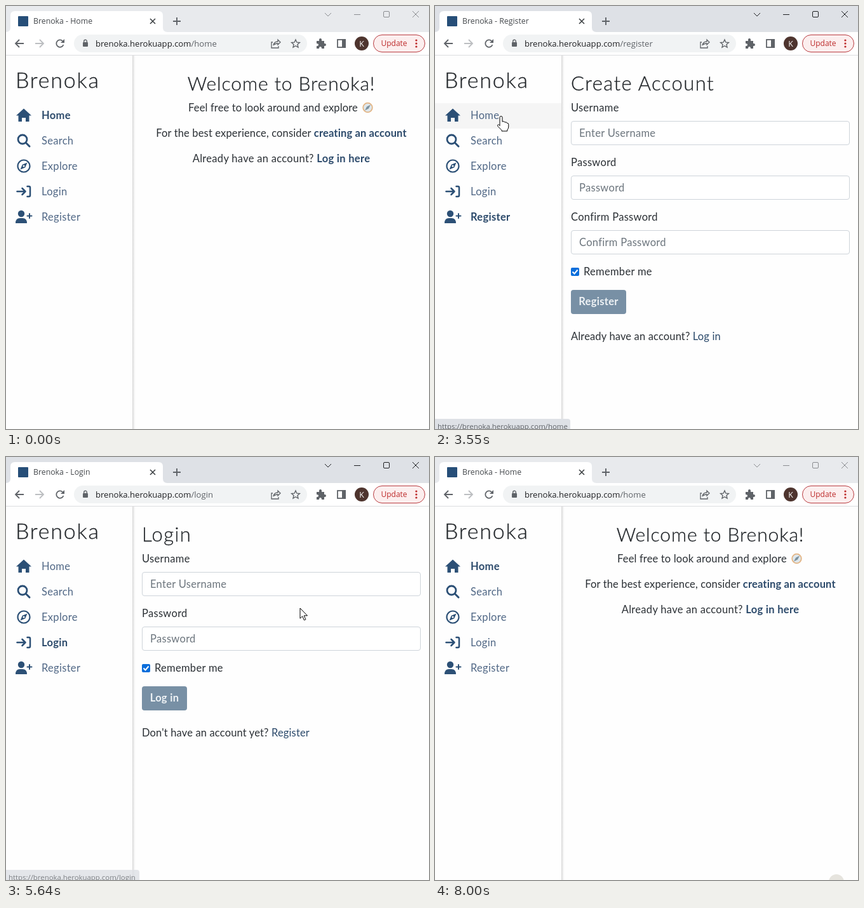
Animation of 666 by 666 pixels, one loop 8.13 s. Source, as an HTML page:

```html
<!DOCTYPE html>
<html lang="en">
<head>
<meta charset="utf-8">
<title>Brenoka</title>
<style>
html, body { margin: 0; width: 100%; height: 100%; overflow: hidden; background: #fff; }
svg { display: block; width: 666px; height: 666px; }
text { font: 16.5px Lato, sans-serif; letter-spacing: .3px; fill: #2b3035; white-space: pre; }
.ui { font: 12.3px "Open Sans", sans-serif; letter-spacing: 0; fill: #45494d; }
.url { font-size: 13.1px; fill: #202124; }
.status { font-size: 11.4px; fill: #5f6368; }
.logo, .head { font-weight: 300; font-size: 34px; letter-spacing: 1.8px; fill: #212529; stroke: #212529; stroke-width: .3px; }
.head { font-size: 31px; letter-spacing: 1.4px; }
.welcome { font-size: 30px; letter-spacing: .9px; }
.tight { letter-spacing: .15px; }
.mid { text-anchor: middle; }
.b { font-weight: 700; fill: #2c4a6b; }
.nav text { fill: #516886; }
.nav .on text { font-weight: 700; fill: #2c4a6b; }
.nav rect { fill: none; }
.nav .over rect { fill: #f5f5f5; }
.link { fill: #2c4a6b; }
.link.over { fill: #182639; text-decoration: underline; }
.hint { fill: #6c757d; }
.btn { font-weight: 700; fill: #eef2f5; }
.line { fill: none; stroke: #5f6368; stroke-width: 1.8; }
.thin { fill: none; stroke: #1f2023; stroke-width: 1; }
.ink { fill: #2c5076; }
.pen { fill: none; stroke: #2c5076; stroke-width: 2.5; stroke-linecap: round; stroke-linejoin: round; }
.idle .thin { stroke: #8b8d91; }
.idle .strip { fill: #e8eaed; }
.idle .plus { stroke: #5f6368; }
.cursor path { fill: #fff; stroke: #000; stroke-width: 1; stroke-linejoin: round; }
</style>
</head>
<body>
<svg viewBox="0 0 666 666">
  <defs>
    <linearGradient id="shade">
      <stop offset="0" stop-color="#d4d4d4"/>
      <stop offset="1" stop-color="#fff" stop-opacity="0"/>
    </linearGradient>
  </defs>
  <rect width="666" height="666" fill="#fefefe"/>

  <g id="view"></g>

  <rect x="199" y="78" width="6" height="588" fill="url(#shade)"/>
  <rect y="78" width="199" height="588" fill="#fefefe"/>
  <text class="logo" x="15" y="129">Brenoka</text>
  <g class="nav" id="nav"></g>

  <g id="chrome">
    <rect class="strip" width="666" height="42" fill="#dee1e6"/>
    <path d="M0 41q7 0 7-7V15q0-7 7-7H240q7 0 7 7V34q0 7 7 7z" fill="#fff"/>
    <rect y="41" width="666" height="37" fill="#fff"/>
    <path d="M0 77.5H666" stroke="#dcdde0"/>
    <rect x="19" y="16" width="16" height="16" rx="1" fill="#264e78"/>
    <text class="ui" id="title" x="43" y="28"></text>
    <path d="M227 20l8 8m0-8l-8 8" class="line" style="stroke:#3c4043;stroke-width:1.6"/>
    <path d="M263 24H275M269 18V30" class="line plus" style="stroke-width:1.9"/>
    <path class="thin" d="M502 11l5 5 5-5M548 13.5H558M640 8l10 10m0-10l-10 10"/>
    <rect class="thin" x="594.5" y="8.5" width="9" height="9" rx="1.5"/>
    <path class="line" d="M28 59H15M21 53l-6 6 6 6"/>
    <path class="line" style="stroke:#bcbec1" d="M46 59H59M53 53l6 6-6 6"/>
    <path class="line" d="M89 55a5.7 5.7 0 1 0 1.4 6"/>
    <path d="M92 52v6h-6z" fill="#5f6368"/>
    <rect x="107" y="45" width="367" height="28" rx="14" fill="#f1f3f4"/>
    <rect x="121" y="57" width="8" height="7" rx="1" fill="#5f6368"/>
    <path class="line" style="stroke-width:1.4" d="M122.7 58V55.5a2.3 2.3 0 0 1 4.6 0V58"/>
    <text class="ui url" x="141" y="64">brenoka.herokuapp.com<tspan id="path" fill="#5f6368"></tspan></text>
    <path class="line" style="stroke-width:1.3" d="M420 57h-2v9h11v-3M421 62q1-6 7-6V53l4 4-4 4V59q-5 0-7 3z"/>
    <path class="line" style="stroke-width:1.4" d="M456 53l1.9 4.2 4.5.4-3.4 3 1 4.4-4-2.3-4 2.3 1-4.4-3.4-3 4.5-.4z"/>
    <path fill="#5f6368" d="M489 55h4q-.5-4 2-4t2 4h4v4q3-.5 3 2t-3 2v4h-4q0-3-2-3t-2 3h-4v-4q3 0 3-2t-3-2z"/>
    <rect class="line" x="522" y="53" width="12" height="12"/>
    <path fill="#5f6368" d="M529 52h6v14h-6z"/>
    <circle cx="560" cy="59" r="11" fill="#4e342e"/>
    <text class="ui mid" x="560" y="63.5" style="fill:#fff">K</text>
    <rect x="578.5" y="45.5" width="81" height="27" rx="13.5" fill="#fceeee" stroke="#b83a3f"/>
    <text class="ui" x="590.5" y="63" style="fill:#bd2b2b;font-size:12px">Update</text>
    <g fill="#bd2b2b">
      <circle cx="646" cy="54" r="1.6"/><circle cx="646" cy="59" r="1.6"/><circle cx="646" cy="64" r="1.6"/>
    </g>
  </g>

  <g id="status">
    <path id="bar" fill="#dee1e6"/>
    <text class="ui status" x="4" y="665.5"></text>
  </g>
  <circle id="click" r="12"/>
  <g class="cursor" id="cursor">
    <path d="M0 0V16.2l3.7-3.5 2.7 6.2 2.5-1.1-2.7-6H11.5z"/>
    <path d="M-2 13V1.5a2 2 0 0 1 4 0V8q3-1 4 1 3-.8 3.5 1.5 2.3-.3 2.3 2V16q0 3-2 5v2H1V21.5L-5 15.5q-1.3-2.5.5-3 1 0 2.5 2z"/>
    <path d="M-3-8h2l1 1 1-1h2M0-7V7M-3 8h2l1-1 1 1h2" style="fill:none"/>
  </g>
</svg>
<script>
const $ = id => document.getElementById(id);
const LOOP = 8130;

const icons = [
  '<path class="ink" d="M28 161.5L16 172.5h3.5V182H25v-6h6v6h5.5v-9.5H40z"/>',
  '<circle class="pen" cx="26" cy="210" r="7" style="stroke-width:2.8"/><path class="pen" style="stroke-width:3" d="M31.5 215.5l5.5 5.5"/>',
  '<circle class="pen" cx="28" cy="252" r="9.5" style="stroke-width:2.2"/><path class="ink" fill-rule="evenodd" d="M33.5 246.5l-3.2 7.8-7.8 3.2 3.2-7.8zM28 250.5a1.5 1.5 0 1 0 .01 0z"/>',
  '<path class="pen" d="M17.5 292H30M25.5 287l5 5-5 5M33.5 284H36q2 0 2 2v12q0 2-2 2h-2.5"/>',
  '<circle class="ink" cx="24" cy="327" r="5.2"/><path class="ink" d="M15 342q0-8 7-8h4q7 0 7 8z"/><path class="pen" style="stroke-width:2" d="M33.5 330.5h7M37 327v7"/>'
];
$('nav').innerHTML = ['Home', 'Search', 'Explore', 'Login', 'Register'].map((name, i) =>
  `<g><rect y="${153 + 40 * i}" width="199" height="40"/>${icons[i]}<text x="56" y="${178 + 40 * i}">${name}</text></g>`
).join('');
const rows = [...$('nav').children];

const field = (y, label, hint) =>
  `<text x="214" y="${y}">${label}</text>
   <rect x="214.5" y="${y + 15.5}" width="438" height="37" rx="3.5" fill="#fff" stroke="#ced4da"/>
   <text class="hint" x="227" y="${y + 40}">${hint}</text>`;

const foot = (y, width, label, ask, link) =>
  `<rect x="214" y="${y - 12}" width="13" height="13" rx="2" fill="#0b6edb"/>
   <path d="M216.5 ${y - 5.5}l3 3 5-6" fill="none" stroke="#fff" stroke-width="2"/>
   <text x="234" y="${y}">Remember me</text>
   <rect x="214" y="${y + 23}" width="${width}" height="38" rx="4" fill="#7890a5"/>
   <text class="btn mid" x="${214 + width / 2}" y="${y + 47}">${label}</text>
   <text class="tight" x="214" y="${y + 102}">${ask} <tspan class="link">${link}</tspan></text>`;

const head = name => `<text class="head" x="214" y="133">${name}</text>`;
const login = field(166, 'Username', 'Enter Username') + field(252, 'Password', 'Password');

const pages = {
  home: { row: 0, title: 'Home', bar: 213, inputs: [], html:
    `<text class="head welcome mid" x="433.5" y="133">Welcome to Brenoka!</text>
     <text class="tight" x="287" y="166">Feel free to look around and explore</text>
     <circle cx="569.5" cy="160" r="7.3" fill="#dfe7ec" stroke="#e3b585" stroke-width="1.8"/>
     <path d="M574 155.5l-3 6-6 3 3-6z" fill="#7d929f"/>
     <text class="tight mid" x="433.5" y="206">For the best experience, consider <tspan class="b link">creating an account</tspan></text>
     <text class="mid" x="433.5" y="246">Already have an account? <tspan class="b link">Log in here</tspan></text>` },
  register: { row: 4, title: 'Register', bar: 220, inputs: [181, 267, 353], html:
    head('Create Account') + login + field(338, 'Confirm Password', 'Confirm Password') +
    foot(424, 87, 'Register', 'Already have an account?', 'Log in') },
  login: { row: 3, title: 'Login', bar: 210, inputs: [181, 267], html:
    head('Login') + login + foot(338, 71, 'Log in', "Don't have an account yet?", 'Register') }
};
for (const key in pages) {
  const g = document.createElementNS('http://www.w3.org/2000/svg', 'g');
  g.innerHTML = pages[key].html;
  pages[key].node = $('view').appendChild(g);
}
const links = [...pages.home.node.querySelectorAll('.link')];
const linkBox = [[485, 190, 632, 211], [489, 230, 572, 251]];

// [start, value] lists, latest start wins
const pageAt = [[0, 'home'], [2370, 'register'], [3860, 'home'], [5290, 'login'], [6710, 'home']];
const titleAt = [[0, 'home'], [2570, 'register'], [4080, 'home'], [5490, 'login'], [6910, 'home']];
const pick = (list, t) => list.filter(e => e[0] <= t).pop()[1];

// status bubble: page, shown, fade start
const bubbles = [['register', 1900, 2840], ['home', 3550, 4350], ['login', 4880, 5560], ['home', 6310, 7240]];
const clicks = [[2080, 2220], [3610, 3740], [5090, 5220], [6640, 6710], [8000, LOOP]];

const glide = u => u * u * (3 - 2 * u);
const settle = u => 1 - (1 - u) ** 1.66;
// start, end, steps, from, to, easing, bend of x against y
const moves = [
  [790, 1840, 16, [673, 651], [573, 205], settle, .866],
  [2770, 3350, 10, [573, 205], [104, 174], glide, 1],
  [4280, 4950, 11, [104, 174], [515, 248], glide, 1],
  [5560, 6110, 9, [515, 248], [101, 165], glide, 1],
  [7110, 7870, 12, [101, 165], [632, 667], glide, 1.36]
];

function place(t) {
  const [t0, t1, n, from, to, ease, bend] = moves.filter(m => m[0] <= t).pop() || moves[0];
  const step = Math.min(n, 1 + Math.floor((t - t0) / (t1 - t0) * (n - 1) + 1e-6));
  const rest = 1 - ease(step / n);
  return [to[0] + (from[0] - to[0]) * rest ** bend, to[1] + (from[1] - to[1]) * rest];
}

const show = (node, on) => { node.style.display = on ? '' : 'none'; };

function render(t) {
  const key = pick(pageAt, t), page = pages[key], title = pick(titleAt, t);
  for (const k in pages) show(pages[k].node, k === key);
  $('title').textContent = 'Brenoka - ' + pages[title].title;
  $('path').textContent = '/' + key;
  $('chrome').classList.toggle('idle', t < 2080 || t >= 8000);

  const [x, y] = t < 790 ? [700, 700] : place(t);
  const row = x < 199 ? Math.floor((y - 153) / 40) : -1;
  rows.forEach((r, i) => {
    r.classList.toggle('on', i === page.row);
    r.classList.toggle('over', i === row && i !== page.row);
  });
  let onLink = row >= 0 && row < 5;
  linkBox.forEach(([l, top, r, bottom], i) => {
    const over = key === 'home' && x > l && x < r && y > top && y < bottom;
    links[i].classList.toggle('over', over);
    onLink = onLink || over;
  });
  const onInput = x > 214 && x < 653 && page.inputs.some(top => y > top && y < top + 38);
  const shape = onLink ? 1 : onInput ? 2 : 0;
  [...$('cursor').children].forEach((c, i) => show(c, i === shape));
  show($('cursor'), t >= 790 && t < 7870);
  $('cursor').setAttribute('transform', `translate(${Math.round(x)} ${Math.round(y)})`);

  const click = clicks.find(c => t >= c[0] && t < c[1]);
  show($('click'), click);
  $('click').setAttribute('cx', x);
  $('click').setAttribute('cy', y + (t >= 8000 ? 2 : 0));
  $('click').setAttribute('fill', t >= 8000 ? '#e6e4de' : 'rgba(244,232,20,.72)');

  const bubble = bubbles.filter(b => b[1] <= t).pop();
  show($('status'), bubble);
  if (bubble) {
    const [name, , end] = bubble, w = pages[name].bar;
    const fade = Math.floor(Math.max(0, t - end) / 67) / 5;
    $('status').style.opacity = Math.max(0, 1 - fade);
    $('bar').setAttribute('d', `M0 650H${w - 4}q4 0 4 4V666H0z`);
    $('status').lastElementChild.textContent =
      'https://brenoka.herokuapp.com/' + (name === 'register' ? 'regist...' : name);
  }
}

const begin = performance.now();
(function tick() {
  render((performance.now() - begin) % LOOP);
  requestAnimationFrame(tick);
})();
</script>
</body>
</html>
```
